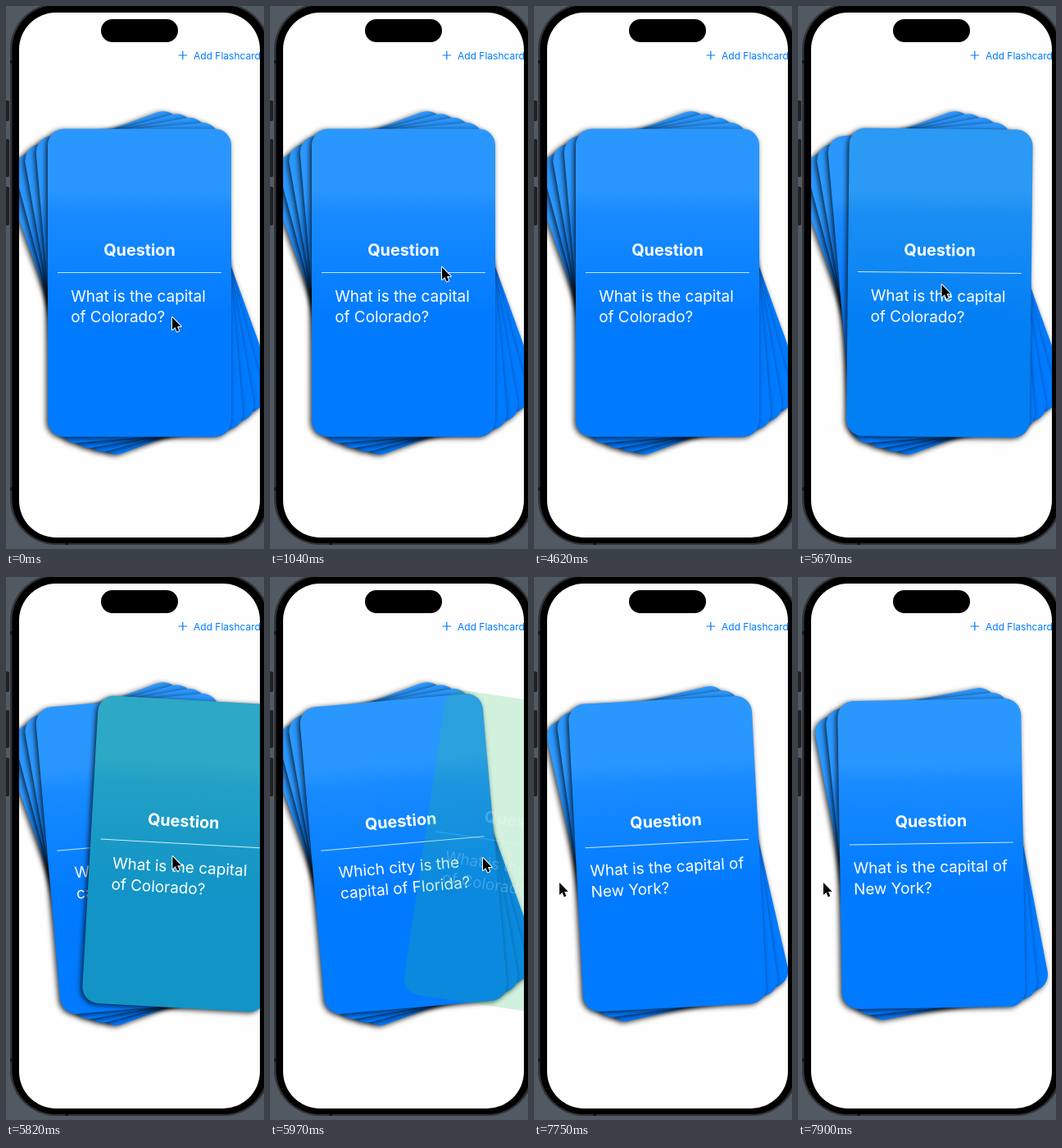
Recreate the animation shown at these times as an HTML page with a canvas. Size 315 by 661 pixels, loop 8 s.

```html
<!DOCTYPE html>
<html lang="en">
<head>
<meta charset="utf-8">
<title>Flashcards</title>
<style>
html, body { margin: 0; width: 100%; height: 100%; overflow: hidden; background: #515963; }
canvas { display: block; width: 315px; height: 661px; }
</style>
</head>
<body>
<canvas id="stage" width="315" height="661"></canvas>
<script>
const ctx = document.getElementById('stage').getContext('2d');
const LOOP = 8000, STEP = 149.1;
const FONT = 'Inter, "Open Sans", sans-serif';
const BLUE = [0, 122, 255], GREEN = [52, 199, 89], GLOW = [42, 29, 0];
const CENTER = { x: 163, y: 337 }, CARD = { w: 224, h: 375, r: 20 };
const DECK = 5, FAN = 5;

const questions = [
  ['What is the capital', 'of Colorado?'],
  ['Which city is the', 'capital of Florida?'],
  ['What is the capital of', 'New York?']
];

// Steps at which the pointer leaves or returns and a card is dismissed
const HIDE = 31, SHOW = 35, FIRST_GONE = 41, SECOND_GONE = 52;
const GRAB_X = 169;

const linear = t => t;
const accelerate = t => t ** 2.4;
const swipe = t => t < .5 ? 16 * t ** 5 : 1 - 16 * (1 - t) ** 5;

// Pointer moves; it rests in between
const moves = [
  { from: 3, to: 7, x: 210, y: 318, ease: linear },
  { from: 21, to: 22, x: 242, y: 361, ease: linear },
  { from: 22, to: 26, x: 180, y: 131, ease: linear },
  { from: 26, to: 29, x: 160, y: 304, ease: linear },
  { from: 34, to: 35, x: GRAB_X, y: 339, ease: linear },
  { from: 37, to: 40, x: 260, y: 342, ease: accelerate },
  { from: 40, to: 41, x: 228, y: 372, ease: linear },
  { from: 43.6, to: 53, x: 31, y: 372, ease: swipe }
];

const mix = (a, b, t) => a + (b - a) * t;
const clamp = v => Math.max(0, Math.min(1, v));
const rgb = c => `rgb(${c.map(Math.round).join()})`;
const rad = deg => deg * Math.PI / 180;

function box(x, y, w, h, r, fill) {
  ctx.beginPath();
  ctx.roundRect(x, y, w, h, r);
  ctx.fillStyle = fill;
  ctx.fill();
}

function text(str, x, y, font, fill, align = 'left') {
  ctx.font = `${font} ${FONT}`;
  ctx.textAlign = align;
  ctx.fillStyle = fill;
  ctx.fillText(str, x, y);
}

function pointerAt(k) {
  let x = 203, y = 379;
  for (const m of moves) {
    const t = m.ease(clamp((k - m.from) / (m.to - m.from)));
    x = mix(x, m.x, t);
    y = mix(y, m.y, t);
  }
  return [x, y];
}

function cardFill(tint) {
  const base = BLUE.map((c, i) => mix(c, GREEN[i], tint));
  const lit = glow => rgb(base.map((c, i) => c + GLOW[i] * glow * (1 - tint)));
  const fill = ctx.createLinearGradient(0, -CARD.h / 2, 0, CARD.h / 2);
  fill.addColorStop(.2, lit(1));
  fill.addColorStop(.27, lit(.6));
  fill.addColorStop(.62, lit(0));
  return fill;
}

function drawQuestion(lines) {
  text('Question', 0, -33, '700 19.8px', '#fff', 'center');
  ctx.fillStyle = 'rgba(255,255,255,.8)';
  ctx.fillRect(-100, -13, 200, 1);
  ctx.font = `400 18.9px ${FONT}`;
  const left = -Math.max(...lines.map(line => ctx.measureText(line).width)) / 2 - 1.5;
  lines.forEach((line, i) => text(line, left, 22.5 + i * 25.5, '400 18.9px', '#fff'));
}

function drawCard(lines, angle, drag) {
  const { w, h, r } = CARD;
  ctx.save();
  ctx.translate(CENTER.x + drag * 1.5, CENTER.y);
  ctx.rotate(rad(angle + drag / 10.7));
  ctx.globalAlpha = clamp(2 - drag / 51);
  if (ctx.globalAlpha === 1) {
    ctx.shadowColor = 'rgba(0,0,0,.8)';
    ctx.shadowBlur = 6;
    ctx.shadowOffsetX = -2;
    ctx.shadowOffsetY = 1.5;
  }
  box(-w / 2, -h / 2, w, h, r, cardFill(clamp(drag / 100)));
  ctx.shadowColor = 'transparent';
  if (lines) drawQuestion(lines);
  ctx.restore();
}

function drawDeck(k, px) {
  const top = (k >= FIRST_GONE) + (k >= SECOND_GONE);
  const settle = 1 - .3 ** Math.max(0, k - SECOND_GONE + 1);
  const drag = k >= SHOW ? Math.max(0, px - GRAB_X) : 0;
  for (let i = DECK - 1; i >= top; i--) {
    drawCard(questions[i], FAN * (2 * settle - i), i === 0 ? drag : 0);
  }
}

function drawPhone() {
  ctx.fillStyle = '#515963';
  ctx.fillRect(0, 0, 315, 661);
  for (const [y, h] of [[115, 25], [162, 46], [220, 47]]) box(-3, y, 7, h, 2, '#202123');
  box(5, -3, 317, 659, 56, '#303236');
  for (const y of [66, 586]) box(5, y, 3, 4, 0, '#16181a');
  box(72, 654, 4, 2, 0, '#16181a');
  box(7.5, -1, 312, 655, 54, '#000');
}

function drawHeader() {
  box(116, 16, 94, 28, 14, '#000');
  box(210.5, 59.4, 10.5, 1.2, 0, '#007aff');
  box(215.2, 54.7, 1.2, 10.5, 0, '#007aff');
  text('Add Flashcard', 229, 64.5, '400 12px', '#007aff');
}

function drawPointer(x, y) {
  const shape = [[0, 0], [0, 15], [3.4, 12], [5.8, 17.4], [8.3, 16.3], [6, 11], [10.7, 11]];
  ctx.save();
  ctx.translate(x, y);
  ctx.beginPath();
  shape.forEach(p => ctx.lineTo(...p));
  ctx.closePath();
  ctx.lineJoin = 'round';
  ctx.lineWidth = 2;
  ctx.strokeStyle = '#fff';
  ctx.stroke();
  ctx.fillStyle = '#000';
  ctx.fill();
  ctx.restore();
}

function draw(time) {
  const k = Math.floor((time % LOOP + 4) / STEP);
  const [x, y] = pointerAt(k);
  drawPhone();
  ctx.save();
  box(16, 8, 294, 639, 45, '#fefefe');
  ctx.clip();
  drawHeader();
  drawDeck(k, x);
  ctx.restore();
  if (k < HIDE || k >= SHOW) drawPointer(x, y);
}

const start = performance.now();
function tick() {
  draw(performance.now() - start);
  requestAnimationFrame(tick);
}
tick();
</script>
</body>
</html>
```
